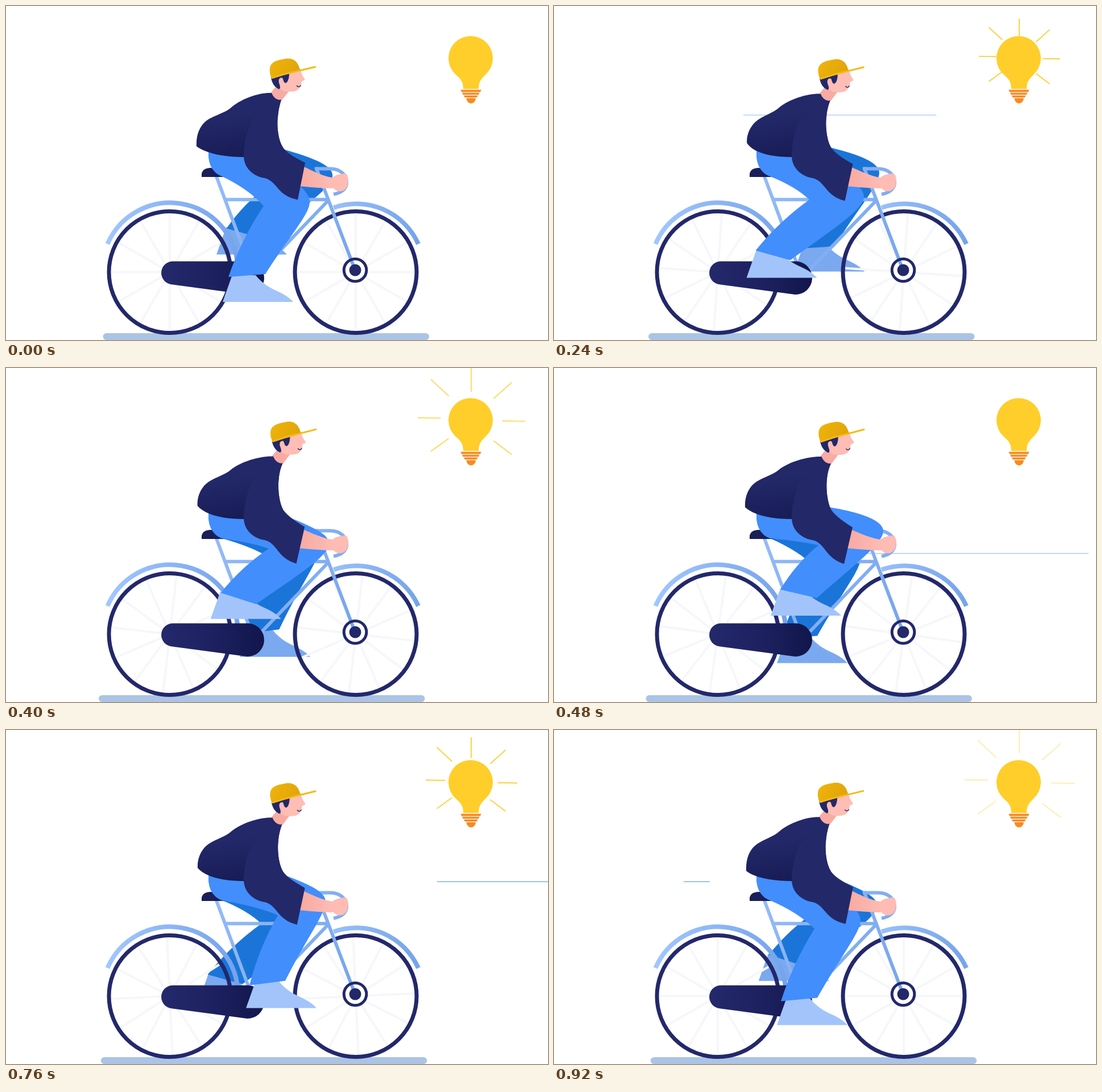
These frames come from a looping animation (953 px wide and 588 px high, 960 ms). An HTML page:

```html
<!DOCTYPE html>
<html lang="en">
<head>
<meta charset="utf-8">
<title>Cyclist</title>
<style>
html, body { margin: 0; width: 100%; height: 100%; overflow: hidden; background: #fff; }
svg { display: block; width: 100%; height: 100%; }
.line { fill: none; }
</style>
</head>
<body>
<svg viewBox="0 0 953 588" preserveAspectRatio="none">
  <defs>
    <linearGradient id="tube" gradientUnits="userSpaceOnUse" x1="370" y1="290" x2="600" y2="460">
      <stop offset="0" stop-color="#94bcf8"/><stop offset="1" stop-color="#76a6ec"/>
    </linearGradient>
    <linearGradient id="rearGuard" gradientUnits="userSpaceOnUse" x1="175" y1="0" x2="410" y2="0">
      <stop offset="0" stop-color="#a2c7ff"/><stop offset="1" stop-color="#74a3ea"/>
    </linearGradient>
    <linearGradient id="frontGuard" gradientUnits="userSpaceOnUse" x1="575" y1="0" x2="730" y2="0">
      <stop offset="0" stop-color="#98c0fa"/><stop offset="1" stop-color="#74a3ea"/>
    </linearGradient>
    <linearGradient id="case" x1="0" x2="1">
      <stop offset="0" stop-color="#24296c"/><stop offset=".5" stop-color="#1d2160"/><stop offset="1" stop-color="#12164c"/>
    </linearGradient>
    <linearGradient id="cloth" gradientUnits="userSpaceOnUse" x1="380" y1="195" x2="392" y2="266">
      <stop offset="0" stop-color="#232869"/><stop offset="1" stop-color="#181c56"/>
    </linearGradient>
    <linearGradient id="skin" gradientUnits="userSpaceOnUse" x1="518" y1="0" x2="575" y2="0">
      <stop offset="0" stop-color="#f8aaa2"/><stop offset="1" stop-color="#febcb5"/>
    </linearGradient>
    <linearGradient id="cap" gradientUnits="userSpaceOnUse" x1="468" y1="95" x2="512" y2="122">
      <stop offset="0" stop-color="#efb30b"/><stop offset="1" stop-color="#dfa409"/>
    </linearGradient>
    <g id="wheel">
      <g class="spokes" stroke="#f6f7fa" stroke-width="4"></g>
      <circle r="107" class="line" stroke="#23286a" stroke-width="7"/>
    </g>
  </defs>

  <g id="streaks" stroke-width="1.4"></g>

  <g id="rays" stroke="#fdcc26" stroke-width="1.7">
    <path vector-effect="non-scaling-stroke" d="M0 -84V-45M-65 -65L-36 -38M65 -60L36 -34M-86 -3L-49 -2.5M50 2L87 2.5M-65 51L-36 30M65 56L36 34"/>
  </g>
  <path fill="#ffce2a" d="M804 146C804 133 799 128 791 121A39 39 0 1 1 843 121C836 128 831 133 831 146Z"/>
  <g fill="#f98a1e">
    <path d="M799.5 147.5H835.500L834 151.500H801ZM802 152.700H832.500L831 156.300H803.500ZM805 157.500H829.500L828 161H806.500Z"/>
    <path d="M809.500 162.300H826C825.500 168 822 171.500 817.700 171.500S810 168 809.500 162.300Z"/>
  </g>

  <rect id="ground" y="576" width="573.500" height="12" rx="6" fill="#abc4e5"/>

  <g id="far"><path class="shoe" fill="#7ba9ef"/><path class="pants" fill="#1b75d9"/></g>

  <path class="line" stroke="url(#rearGuard)" stroke-width="8" d="M178.500 419A119.500 119.500 0 0 1 407.500 456"/>
  <path class="line" stroke="url(#frontGuard)" stroke-width="8" d="M576 355A119.500 119.500 0 0 1 725 419"/>
  <use href="#wheel" x="288" y="468.500"/>
  <use href="#wheel" x="615" y="468.500"/>
  <circle cx="614" cy="465" r="19.500" fill="#fff"/>
  <g class="line" stroke="url(#tube)" stroke-width="6">
    <path d="M385 340.800H566M566 343L450 464M369.500 299L426.500 452M545 284L611.500 459"/>
    <path d="M543 286.500H570C588 286.500 600 298 599 312C598 323 588 329 576 331.500"/>
  </g>
  <circle cx="614" cy="465" r="19.800" class="line" stroke="#23286a" stroke-width="5"/>
  <circle cx="614" cy="465" r="10.500" fill="#23286a"/>
  <path fill="url(#case)" d="M294 449.500H427A29.300 29.300 0 0 1 424 508L291.500 490.200A20.400 20.400 0 0 1 294 449.500Z"/>
  <path fill="#1a1e59" d="M344 301V295C346 287 353 285 361 285L392 297V301Z"/>

  <g id="near"><path class="shoe" fill="#a3c4fb"/><path class="pants" fill="#428efc"/></g>

  <path id="arm" fill="url(#skin)"/>
  <g id="head">
    <path fill="#f8aba3" d="M478 138L499 148L485 166C476 168 468 162 466 152Z"/>
    <path fill="#febdb5" d="M478 124L517 110C519 116 520 122 525 128C526 131 523 132 520 132.500C519 137 518.500 142 514 147C508 152 497 151 489 150L478 143Z"/>
    <path fill="#23286a" d="M466 125L498 117C498 126 496 134 492 135.500C488 136 488 130 486 126.500C480 125 478 131 481 138C482 142 483 145 480 146.500C472 143 467 135 466 125Z"/>
    <path class="line" stroke="#23286a" stroke-width="1.500" stroke-linecap="round" d="M511.500 140.500C513 143 517 143 518 139.800"/>
    <path fill="url(#cap)" d="M467 127.500C463 118 462 108 467 102C473 95 486 94 494 92.500C506 92 514 98 517 113.500Z"/>
    <path class="line" stroke="#f6ba10" stroke-width="3" stroke-linecap="round" d="M468 126.500C485 121 500 117 517 113.500L543.500 107.300"/>
  </g>
  <path id="body" fill="url(#cloth)"/>
  <path id="sleeve" fill="#232869"/>
</svg>
<script>
const LOOP = 960, STEP = 40;
const $ = (s, root = document) => root.querySelector(s);
const clamp = (v, a = 0, b = 1) => Math.min(b, Math.max(a, v));
const draw = (el, d) => el.setAttribute('d', d);

// crank angle, then cuff back and cuff front (from the heel), knee pit, kneecap
const POSES = [
  [0, 10, -44, 75, -49, 453, 352, 534, 345],
  [45, 17, -46, 83, -40, 447, 346, 532, 350],
  [90, 16, -48, 77, -31, 449, 341, 545, 336],
  [120, 18, -50, 80, -26, 458, 330, 557, 319],
  [150, 18, -46, 80, -26, 462, 318, 568, 309],
  [180, 17, -46, 81, -31, 465, 312, 579, 287],
  [210, 13, -43, 78, -37, 470, 315, 580, 273],
  [240, 10, -41, 73, -42, 475, 320, 576, 289],
  [285, 6, -40, 69, -48, 478, 326, 562, 302],
  [345, 7, -42, 71, -48, 458, 350, 539, 335]
];
// time, then back corner of the jacket
const HEM = [
  [0, 335, 247], [120, 340, 243], [320, 338, 241], [480, 336, 245],
  [640, 340, 245], [760, 337, 243], [920, 338, 248]
];

// periodic smooth curve through keys [time, ...values]
function curve(keys, period, t) {
  const n = keys.length;
  const at = i => {
    const turn = Math.floor(i / n), k = keys[i - turn * n];
    return [k[0] + turn * period, ...k.slice(1)];
  };
  let i = n - 1;
  while (keys[i][0] > t) i--;
  const [a, b, c, d] = [at(i - 1), at(i), at(i + 1), at(i + 2)];
  const w = c[0] - b[0], u = (t - b[0]) / w, v = 1 - u;
  return b.slice(1).map((p, j) => {
    const q = c[j + 1];
    const m0 = (q - a[j + 1]) / (c[0] - a[0]) * w;
    const m1 = (d[j + 1] - p) / (d[0] - b[0]) * w;
    return p * (1 + 2 * u) * v * v + m0 * u * v * v + q * u * u * (3 - 2 * u) - m1 * u * u * v;
  });
}

function leg(id, deg) {
  deg %= 360;
  const a = deg * Math.PI / 180;
  const x = 381 - 42.5 * Math.sin(a), y = 478.5 + 42.5 * Math.cos(a);
  const [lx, ly, rx, ry, bx, by, kx, ky] = curve(POSES, 360, deg);
  const cx = x + lx, cy = y + ly, fx = x + rx, fy = y + ry;
  const dx = cx - bx, dy = cy - by, len = Math.hypot(dx, dy);
  const calfX = (bx + cx) / 2 - dy / len * 9, calfY = (by + cy) / 2 + dx / len * 9;
  const top = 237 + (ky - 272) * 0.52;
  draw($(`#${id} .pants`),
    `M356 245V262C357 283 366 295 380 300` +
    `Q${133 + bx * 0.65} ${299 + (by - 299) * 0.45} ${bx} ${by}` +
    `Q${calfX} ${calfY} ${cx} ${cy}L${fx} ${fy}` +
    `C${fx + (kx - 16 - fx) * 0.65} ${fy + (ky + 28 - fy) * 0.65} ${kx} ${ky + 22} ${kx} ${ky}` +
    `C${kx} ${ky - 17} ${482 + (kx - 482) * 0.66} ${top + (ky - 270) * 0.6} 482 ${top}L420 240Z`);
  draw($(`#${id} .shoe`),
    `M${x} ${y}l17 -48l41 1c12 15 25 22 38 28c13 6 22 12 28 19Z`);
}

function torso(t, k) {
  const [hx, hy] = curve(HEM, LOOP, t);
  const nx = 467 + 3.5 * k, ny = 153 + 3 * k;
  const fx = 484 + 3 * k, fy = 165 + 3 * k;
  const chest = `C${478 + 2 * k} 235 ${476 + 2 * k} 210 ${478 + 2 * k} 195C${479 + 2 * k} 183 ${481 + 3 * k} 175 ${fx} ${fy}`;
  draw($('#body'),
    `M${nx} ${ny}C${445 + 2 * k} ${152 + 3 * k} 415 ${163 + 2 * k} 398 177` +
    `C384 190 ${hx + 27} 193 ${hx + 15} 204C${hx + 5} 213 ${hx - 1} 228 ${hx} ${hy}` +
    `C352 260 385 266 418 266L487 249${chest}` +
    `C${nx + 9} ${ny + 13} ${nx + 3} ${ny + 8} ${nx} ${ny}Z`);
  const ux = 526 - k, uy = 276 + 4.5 * k, dx = 513 - 3 * k, dy = 341 + 4 * k;
  draw($('#sleeve'),
    `M432 200C424 220 417 245 418 266C420 290 440 301 455 303` +
    `C478 309 476 334 ${dx} ${dy}L${ux} ${uy}C510 ${268 + 3 * k} 495 ${260 + k} 487 249${chest}Z`);
  draw($('#arm'),
    `M${ux - 4} ${282 + 2 * k}C538 ${290 + k} 558 300 574 302C580 297 588 295 598 295` +
    `C603 300 603 314 598 321C592 328 582 328 576 321C556 321 538 319 512 317Z`);
  $('#head').setAttribute('transform', `translate(${2 * k} ${2 * k}) rotate(${-1.5 * k} 505 130)`);
}

// start delay, shift along x, height, colour
const STREAKS = [
  [0, 0, 192, '#b3d1fa'], [320, -153, 326.5, '#a6caf9'], [600, 77, 267, '#80b0f5']
];
$('#streaks').innerHTML = STREAKS.map(s => `<path stroke="${s[3]}"/>`).join('');
const streakEls = [...document.querySelectorAll('#streaks path')];

function streaks(t) {
  STREAKS.forEach(([delay, shift, y], i) => {
    const p = t - delay;
    const u = clamp((p - 138) / 219);
    const head = 121 + shift + 1000 * ((368 - p) / 278) ** 2;
    const tail = 121 + shift + 1000 * (1 - u * u * (3 - 2 * u));
    const on = p > 90 && p < 368 && tail - head > 1;
    draw(streakEls[i], on ? `M${head} ${y}H${tail}` : '');
  });
}

function rays(t) {
  const p = t % 480;
  const s = Math.max(0.001, 1.18 - 0.73 * Math.exp((160 - p) / 112));
  const el = $('#rays');
  el.setAttribute('transform', `translate(818 91) scale(${s})`);
  el.setAttribute('opacity', p < 100 ? 0 : clamp((480 - p) / 100));
}

const spokes = $('.spokes');
spokes.innerHTML = Array.from({ length: 6 }, (_, i) =>
  `<path d="M0 -103V103" transform="rotate(${i * 30})"/>`).join('');

function render(t) {
  const k = 1 - Math.abs(1 - t / 480);
  spokes.setAttribute('transform', `rotate(${360 * t / 920})`);
  $('#ground').setAttribute('x', 170.5 - 9 * k);
  leg('near', 360 * t / LOOP);
  leg('far', 360 * t / LOOP + 165);
  torso(t, k);
  streaks(t);
  rays(t);
}

let start = null;
function tick(now) {
  if (start === null) start = now;
  render(Math.floor((now - start) % LOOP / STEP) * STEP);
  requestAnimationFrame(tick);
}
render(0);
requestAnimationFrame(tick);
</script>
</body>
</html>
```
